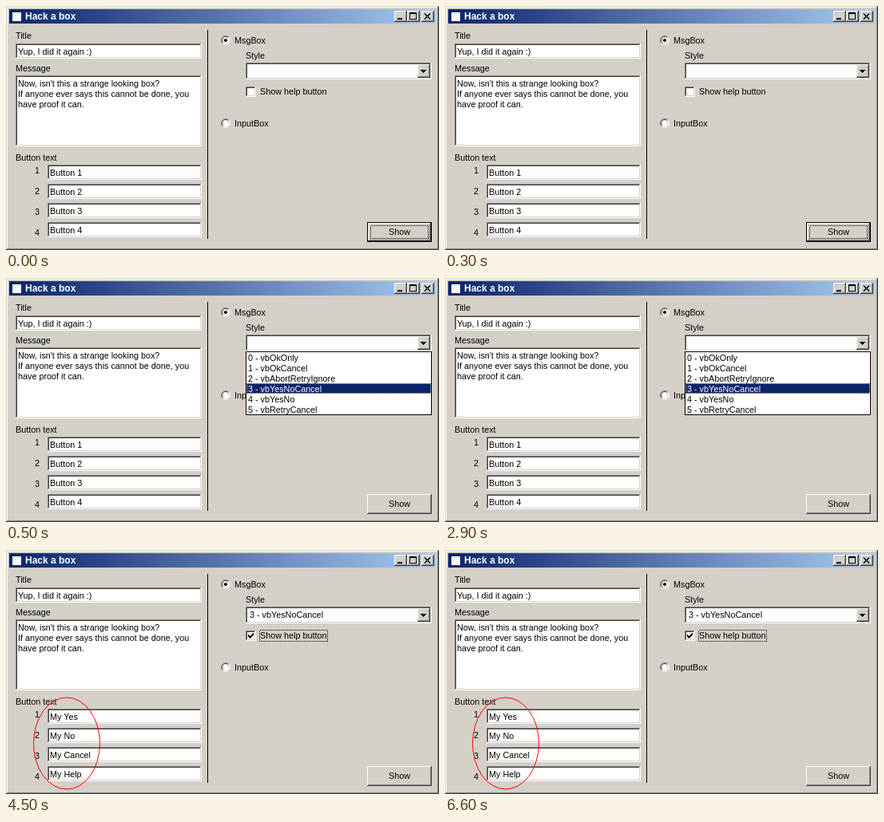
Animation, 542 px wide and 306 px high, one loop 8000 ms. Source, as an HTML page:

```html
<!DOCTYPE html>
<html lang="en">
<head>
<meta charset="utf-8">
<title>Hack a box</title>
<style>
  html, body { margin: 0; width: 100%; height: 100%; overflow: hidden; background: #d4d0c8; }
  svg { display: block; width: 100%; height: 100%; }
  text { font: 10.8px "Liberation Sans", Arial, sans-serif; white-space: pre; }
  .caption { font-size: 12px; font-weight: bold; }
</style>
</head>
<body>
<svg id="stage" viewBox="0 0 542 306" shape-rendering="crispEdges">
  <defs>
    <linearGradient id="bar">
      <stop offset="0" stop-color="#0a246a"/>
      <stop offset="1" stop-color="#a6caf0"/>
    </linearGradient>
  </defs>
</svg>
<script>
const FACE = '#d4d0c8', SHADOW = '#808080', DARK = '#404040', NAVY = '#0a246a';
const stage = document.getElementById('stage');

function add(parent, tag, attrs, content) {
  const el = document.createElementNS('http://www.w3.org/2000/svg', tag);
  for (const key in attrs) el.setAttribute(key, attrs[key]);
  if (content) el.textContent = content;
  return parent.appendChild(el);
}
const group = () => add(stage, 'g', {});
const rect = (g, x, y, width, height, fill) => add(g, 'rect', { x, y, width, height, fill });
const path = (g, d, attrs) => add(g, 'path', { d, fill: 'none', ...attrs });
const label = (g, x, y, content, attrs) => add(g, 'text', { x, y, ...attrs }, content);
const outline = (g, x, y, w, h, stroke, attrs) =>
  add(g, 'rect', { x: x + .5, y: y + .5, width: w - 1, height: h - 1, fill: 'none', stroke, ...attrs });
const focus = (g, x, y, w, h, color = '#000') => outline(g, x, y, w, h, color, { 'stroke-dasharray': '1 1' });

// One-pixel edge: one colour for top and left, another for bottom and right.
function edge(g, x, y, w, h, light, dark) {
  path(g, `M${x + .5} ${y + h - 1}V${y + .5}H${x + w - 1}`, { stroke: light });
  path(g, `M${x} ${y + h - .5}H${x + w - .5}V${y}`, { stroke: dark });
}
function raised(g, x, y, w, h) {
  rect(g, x, y, w, h, FACE);
  edge(g, x, y, w, h, '#fff', DARK);
  edge(g, x + 1, y + 1, w - 2, h - 2, FACE, SHADOW);
}
function sunken(g, x, y, w, h) {
  rect(g, x, y, w, h, '#fff');
  edge(g, x, y, w, h, SHADOW, '#fff');
  edge(g, x + 1, y + 1, w - 2, h - 2, DARK, FACE);
}
function radio(g, cx, cy, checked) {
  const smooth = { 'shape-rendering': 'auto' };
  const arc = (r, sweep, stroke) => {
    const d = r * Math.SQRT1_2;
    path(g, `M${cx - d} ${cy + d}A${r} ${r} 0 0 ${sweep} ${cx + d} ${cy - d}`, { stroke, ...smooth });
  };
  add(g, 'circle', { cx, cy, r: 5, fill: '#fff', ...smooth });
  arc(5.5, 1, SHADOW);
  arc(5.5, 0, '#fff');
  arc(4.5, 1, DARK);
  arc(4.5, 0, FACE);
  if (checked) add(g, 'circle', { cx, cy, r: 2.1, ...smooth });
}

// Window
const base = group();
rect(base, 0, 0, 542, 306, FACE);
edge(base, 0, 0, 542, 306, FACE, DARK);
edge(base, 1, 1, 540, 304, '#fff', SHADOW);
rect(base, 4, 4, 534, 18, 'url(#bar)');
rect(base, 8, 8, 11, 11, '#fff');
label(base, 24, 17, 'Hack a box', { class: 'caption', fill: '#fff' });
for (const x of [486, 502, 520]) raised(base, x, 6, 16, 14);
rect(base, 490, 15, 6, 2, '#000');
outline(base, 505, 8, 9, 9, '#000');
rect(base, 505, 8, 9, 2, '#000');
path(base, 'M524 9.5L531 16.5M531 9.5L524 16.5', { stroke: '#000', 'stroke-width': 1.6, 'shape-rendering': 'auto' });

// Left column
label(base, 12, 41, 'Title');
sunken(base, 12, 47, 233, 19);
label(base, 15, 61, 'Yup, I did it again :)');
label(base, 12, 82, 'Message');
sunken(base, 12, 87, 233, 89);
["Now, isn't this a strange looking box?",
 'If anyone ever says this cannot be done, you',
 'have proof it can.'].forEach((line, i) => label(base, 15, 101 + 13 * i, line));
label(base, 12, 194, 'Button text');
for (let i = 0; i < 4; i++) {
  label(base, 36, 210 + 26 * i, String(i + 1));
  sunken(base, 52, 199 + 24 * i, 193, 19);
}
rect(base, 252, 30, 1, 262, '#000');

// Right column
radio(base, 275, 43, true);
label(base, 286, 47, 'MsgBox');
label(base, 300, 66, 'Style');
sunken(base, 300, 71, 233, 21);
raised(base, 515, 73, 16, 17);
path(base, 'M519 80H526L522.5 84Z', { fill: '#000' });
sunken(base, 300, 101, 13, 13);
label(base, 318, 111, 'Show help button');
radio(base, 275, 147, false);
label(base, 286, 151, 'InputBox');
raised(base, 452, 271, 81, 25);
label(base, 492.5, 287, 'Show', { 'text-anchor': 'middle' });

function buttonTexts(g, texts) {
  texts.forEach((s, i) => label(g, 55, 213 + 24 * i, s));
}

const before = group();
buttonTexts(before, ['Button 1', 'Button 2', 'Button 3', 'Button 4']);

const focused = group();
outline(focused, 452, 271, 81, 25, '#000');
edge(focused, 453, 272, 79, 23, '#fff', DARK);
edge(focused, 454, 273, 77, 21, FACE, SHADOW);
focus(focused, 456, 275, 73, 17);

const list = group();
rect(list, 300, 92, 233, 80, '#fff');
outline(list, 300, 92, 233, 80, '#000');
rect(list, 301, 132, 231, 13, NAVY);
focus(list, 301, 132, 231, 13, '#f5db95');
['OkOnly', 'OkCancel', 'AbortRetryIgnore', 'YesNoCancel', 'YesNo', 'RetryCancel'].forEach((name, i) =>
  label(list, 303, 104 + 13 * i, `${i} - vb${name}`, { fill: i === 3 ? '#fff' : '#000' }));

const after = group();
buttonTexts(after, ['My Yes', 'My No', 'My Cancel', 'My Help']);
label(after, 305, 85, '3 - vbYesNoCancel');
path(after, 'M303 106V109L305 111L310 106V103L305 108Z', { fill: '#000' });
focus(after, 317, 100, 86, 15);
add(after, 'ellipse', { cx: 76, cy: 242.5, rx: 41.5, ry: 57.5, fill: 'none', stroke: '#f00', 'shape-rendering': 'auto' });

// Each part is visible from its first time up to its second, in ms.
const LOOP = 8000;
const schedule = [[before, 0, 4500], [focused, 0, 500], [list, 500, 4500], [after, 4500, LOOP]];
const start = performance.now();

function draw() {
  const t = (performance.now() - start) % LOOP;
  for (const [part, from, to] of schedule)
    part.setAttribute('visibility', t >= from && t < to ? 'visible' : 'hidden');
  requestAnimationFrame(draw);
}
draw();
</script>
</body>
</html>
```
